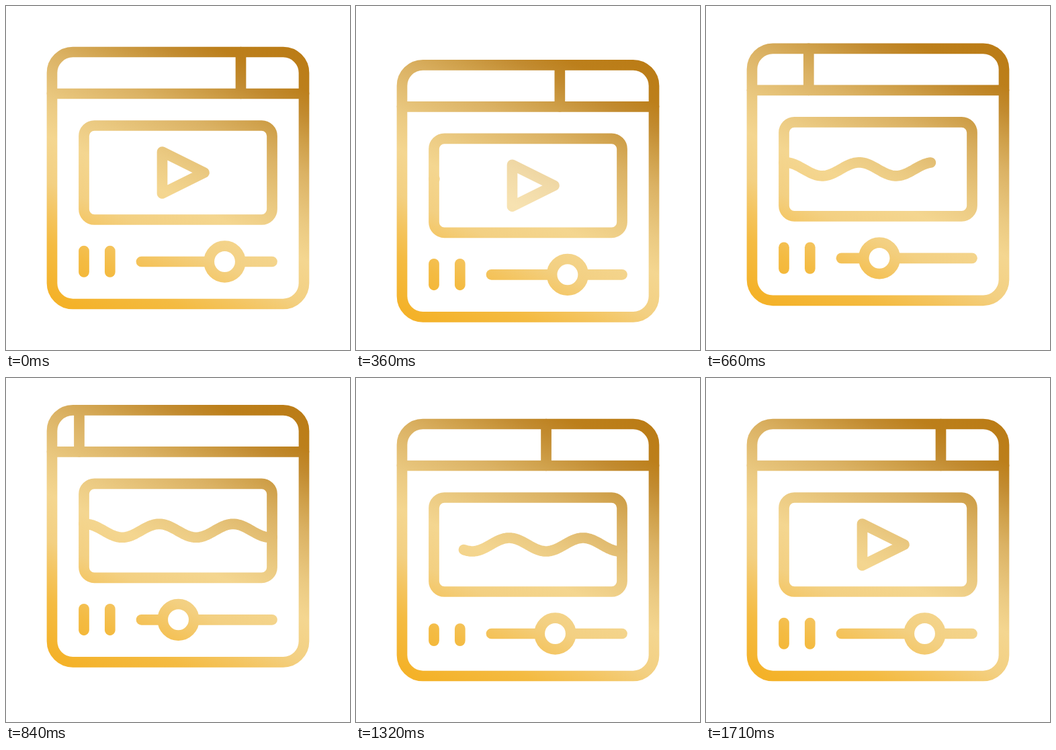
Recreate the animation shown at these times as an HTML page with a canvas. Size 512 by 512 pixels, loop 1800 ms.

```html
<!DOCTYPE html>
<html lang="en">
<head>
<meta charset="utf-8">
<title>Video player icon</title>
<style>
  html, body { margin: 0; width: 100%; height: 100%; overflow: hidden; background: #fff; }
  canvas { display: block; width: 512px; height: 512px; }
</style>
</head>
<body>
<canvas id="stage" width="512" height="512"></canvas>
<script>
const LOOP = 1800;
const ctx = document.getElementById('stage').getContext('2d');

const linear = (t, from, to) => Math.min(1, Math.max(0, (t - from) / (to - from)));
const ease = (t, from, to) => {
  const u = linear(t, from, to);
  return u * u * (3 - 2 * u);
};

// Gold runs from dark at the upper right to amber at the lower left.
const gold = ctx.createLinearGradient(56.3, -117, -155.9, 324);
[
  [0, '#bb7c16'], [0.1, '#bc7f1b'], [0.17, '#c28b30'], [0.25, '#cfa04a'],
  [0.33, '#dbb264'], [0.47, '#ebca82'], [0.567, '#f4d690'],
  [0.69, '#f3d082'], [0.78, '#f4c45e'], [0.86, '#f4bb42'], [1, '#f4b229']
].forEach(([at, color]) => gold.addColorStop(at, color));

function line(...points) {
  ctx.beginPath();
  points.forEach(([x, y]) => ctx.lineTo(x, y));
  ctx.stroke();
}

function box(x, y, w, h, r) {
  ctx.beginPath();
  ctx.roundRect(x, y, w, h, r);
  ctx.stroke();
}

function drawWindow(tabX) {
  box(68.5, 68.5, 375, 375, 31);
  line([68.5, 130.5], [443.5, 130.5]);
  line([tabX, 68.5], [tabX, 130.5]);
  box(116, 178, 280, 140, 15.5);
}

function drawPlay(alpha) {
  if (alpha <= 0) return;
  ctx.globalAlpha = alpha;
  ctx.beginPath();
  ctx.moveTo(232.5, 217);
  ctx.lineTo(295, 248);
  ctx.lineTo(232.5, 279);
  ctx.closePath();
  ctx.stroke();
  ctx.globalAlpha = 1;
}

function drawWave(from, to) {
  if (to - from < 0.002) return;
  const points = [];
  for (let i = 0; i <= 120; i++) {
    const x = 116 + 280 * (from + (to - from) * i / 120);
    points.push([x, 248 - 10 * Math.cos((x - 228) / 110 * 2 * Math.PI)]);
  }
  line(...points);
}

function drawSlider(knobX) {
  const y = 380.5, r = 23.3;
  line([201.5, y], [knobX - r, y]);
  line([knobX + r, y], [396, y]);
  ctx.beginPath();
  ctx.arc(knobX, y, r, 0, 2 * Math.PI);
  ctx.fill();
  ctx.stroke();
}

function drawBars(squeeze) {
  for (const x of [116, 154.8]) {
    line([x, 364.5 + 14 * squeeze], [x, 396 - 8 * squeeze]);
  }
}

function render(t) {
  const lift = 26 * ease(t, 172, 455) - 48.4 * ease(t, 455, 800) + 22.4 * ease(t, 786, 1113);
  const tabX = 349.5 - 242 * (ease(t, 172, 848) - ease(t, 806, 1592));
  const knobX = 325.5 - 69 * (ease(t, 249, 701) - ease(t, 1071, 1523));
  const playAlpha = 1 - linear(t, 260, 600) + linear(t, 1360, 1690);
  const squeeze = ease(t, 1200, 1410) - ease(t, 1410, 1640);

  ctx.setTransform(1, 0, 0, 1, 0, 0);
  ctx.fillStyle = '#fff';
  ctx.fillRect(0, 0, 512, 512);
  ctx.translate(0, lift);
  ctx.strokeStyle = gold;
  ctx.lineWidth = 15.7;
  ctx.lineCap = ctx.lineJoin = 'round';

  drawWave(ease(t, 1207, 1659), ease(t, 346, 798));
  drawWindow(tabX);
  drawPlay(playAlpha);
  drawBars(squeeze);
  drawSlider(knobX);
}

const start = performance.now();
function tick() {
  render((performance.now() - start) % LOOP);
  requestAnimationFrame(tick);
}
tick();
</script>
</body>
</html>
```
